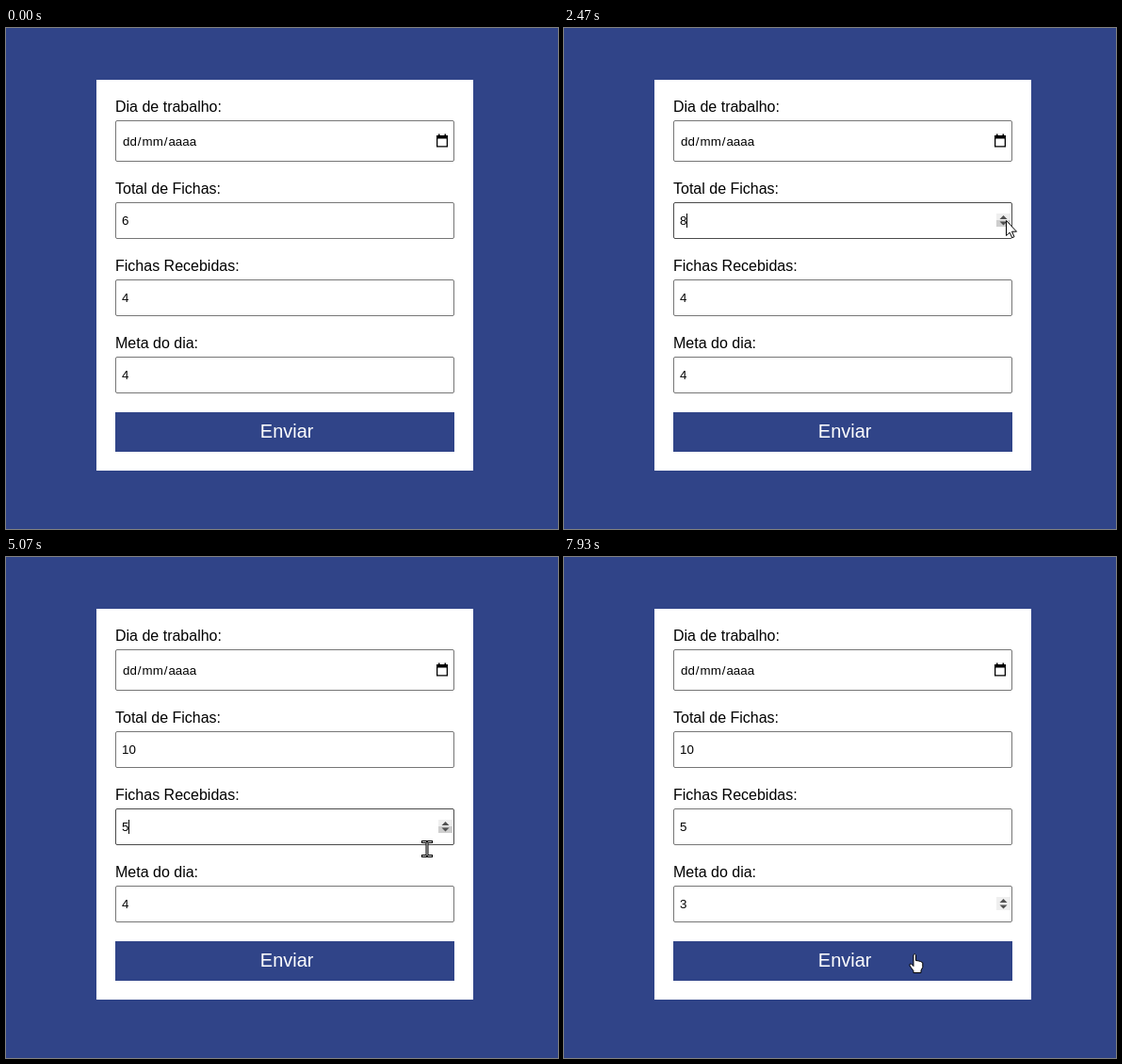
Animation, 586 px wide and 532 px high, one loop 7.99 s. Source, as an HTML page:

```html
<!DOCTYPE html>
<html lang="pt">
<head>
<meta charset="utf-8">
<style>
  html, body { margin: 0; width: 100%; height: 100%; overflow: hidden; background: #304488; }
  svg { display: block; width: 100vw; height: 100vh; font-family: Arial, "Liberation Sans", sans-serif; }
  .label { font-size: 16px; }
  .value { font-size: 13.333px; }
  .box { fill: #fff; stroke: #767676; }
</style>
</head>
<body>
<svg viewBox="0 0 586 532">
  <rect width="586" height="532" fill="#304488"/>
  <rect x="96" y="55" width="400" height="415" fill="#fff"/>

  <text class="label" x="116" y="89">Dia de trabalho:</text>
  <rect class="box" x="116.5" y="98.5" width="359" height="43" rx="1.5"/>
  <text class="value" y="125"><tspan x="124">dd</tspan><tspan dx="1">/</tspan><tspan dx="1">mm</tspan><tspan dx="1">/</tspan><tspan dx="1">aaaa</tspan></text>
  <path d="M457 114H459V112.5H460.5V114H465.500V112.5H467V114H469V126.500H457ZM458.300 117.500V125.200H467.700V117.500Z" fill-rule="evenodd"/>

  <g id="fields"></g>

  <rect x="116" y="408" width="360" height="42" fill="#304488"/>
  <text x="298.200" y="435" font-size="20" text-anchor="middle" fill="#fff">Enviar</text>

  <g id="cursor">
    <path id="arrow" d="M.5 .5V16.500L4.200 13.200L6.700 18.700L9 17.700L6.500 12.200H11.500Z" fill="#fff" stroke="#000"/>
    <g id="ibeam" fill="none">
      <path d="M-6 -7.500H6M-6 7.500H6M0 -8V8" stroke="#000" stroke-width="3"/>
      <path d="M-5 -7.500H-1M1 -7.500H5M-5 7.500H-1M1 7.500H5M0 -7V7" stroke="#ddd"/>
    </g>
    <path id="hand" d="M-1 1.500Q0 -.5 1.500 1.500V7.500L4 7.800L6.500 8.500L8.800 9.800V14.500L7 18V20.500H-1V18.500L-5 13Q-5.500 10.500 -3.500 11L-1 13.500Z" fill="#fff" stroke="#000" stroke-linejoin="round"/>
  </g>
</svg>
<script>
const LOOP = 7990, STEP = 68, BLINK = 500;
const SPIN_X = 459, SPIN_W = 15, SPIN_H = 14;

const fields = [
  { label: 'Total de Fichas:', top: 185, focus: [1550, 3860],
    values: [[0, 6], [2210, 7], [2470, 8], [2660, 9], [2930, 10]] },
  { label: 'Fichas Recebidas:', top: 267, focus: [3860, 5620], values: [[0, 4], [4680, 5]] },
  { label: 'Meta do dia:', top: 349, focus: [5620, LOOP], values: [[0, 4], [7050, 3]] },
];

// Pointer path: time, x, y
const path = [
  [510, 508, 500], [800, 425, 248], [1130, 425, 248], [1390, 398, 201],
  [1550, 398, 201], [1860, 469, 209], [2070, 469, 209], [2071, 469, 204],
  [3110, 469, 204], [3600, 365, 289], [3950, 365, 289], [4150, 511, 322],
  [4350, 465, 283], [5069, 465, 283], [5070, 447, 310], [5140, 447, 310],
  [5410, 405, 366], [5620, 405, 366], [6000, 478, 375], [6260, 468, 377],
  [6520, 468, 377], [6650, 468, 367], [7050, 468, 367], [7051, 468, 370],
  [7380, 468, 370], [7860, 372, 421], [LOOP, 372, 421],
];

const $ = id => document.getElementById(id);
const show = (el, on) => el.setAttribute('visibility', on ? 'visible' : 'hidden');

function add(parent, tag, attrs, text = '') {
  const el = document.createElementNS('http://www.w3.org/2000/svg', tag);
  for (const name in attrs) el.setAttribute(name, attrs[name]);
  el.textContent = text;
  return parent.appendChild(el);
}

for (const f of fields) {
  const g = $('fields'), y = f.spinTop = f.top + 12;
  add(g, 'text', { class: 'label', x: 116, y: f.top - 9 }, f.label);
  f.box = add(g, 'rect', { class: 'box', x: 116.5, y: f.top + .5, width: 359, height: 38, rx: 1.5 });
  f.text = add(g, 'text', { class: 'value', x: 123, y: f.top + 24 });
  f.caret = add(g, 'rect', { y: y, width: 1, height: 15 });
  f.spinner = add(g, 'g', {});
  add(f.spinner, 'rect', { x: SPIN_X, y, width: SPIN_W, height: SPIN_H, fill: '#efefef' });
  f.halves = [0, 7].map(dy =>
    add(f.spinner, 'rect', { x: SPIN_X, y: y + dy, width: SPIN_W, height: 7, fill: '#cecece' }));
  add(f.spinner, 'path', { d: `M462.5 ${y + 6}h8l-4-4zM462.5 ${y + 8.500}h8l-4 4z`, fill: '#505050' });
}

function pointerAt(t) {
  const i = path.findIndex(key => key[0] > t);
  if (i < 1) return null;
  const [a, x0, y0] = path[i - 1], [b, x1, y1] = path[i];
  const k = Math.min(1, (Math.floor((t - a) / STEP) + 1) * STEP / (b - a));
  const e = k * k * (3 - 2 * k);
  return { x: Math.round(x0 + (x1 - x0) * e), y: Math.round(y0 + (y1 - y0) * e) };
}

function draw(t) {
  const p = pointerAt(t), { x, y } = p || { x: -99, y: -99 };
  let shape = x > 116 && x < 476 && y > 408 && y < 450 ? 'hand' : 'arrow';

  for (const f of fields) {
    const [changed, value] = f.values.filter(v => v[0] <= t).pop();
    const focused = t >= f.focus[0] && t < f.focus[1];
    const hovered = x >= 116 && x < 476 && y >= f.top && y < f.top + 44;
    const onSpinner = hovered && x >= SPIN_X && x < SPIN_X + SPIN_W &&
      y >= f.spinTop && y < f.spinTop + SPIN_H;
    const leaving = hovered && t >= 5070 && t < 5140;
    const lower = leaving || y >= f.spinTop + 7;
    if (hovered && !onSpinner) shape = 'ibeam';

    f.text.textContent = value;
    f.box.style.stroke = hovered ? '#4a4a4a' : '#767676';
    const blinkOn = (t - Math.max(changed, f.focus[0])) % (2 * BLINK) < BLINK;
    f.caret.setAttribute('x', value > 9 ? 138 : 130);
    show(f.caret, focused && blinkOn);
    f.spinner.style.display = focused || hovered ? '' : 'none';
    f.halves.forEach((half, i) => show(half, (onSpinner || leaving) && lower === (i === 1)));
  }

  $('cursor').style.display = p ? '' : 'none';
  $('cursor').setAttribute('transform', `translate(${x} ${y})`);
  for (const id of ['arrow', 'ibeam', 'hand']) show($(id), id === shape);
}

const start = performance.now();
function frame() {
  draw((performance.now() - start) % LOOP);
  requestAnimationFrame(frame);
}
frame();
</script>
</body>
</html>
```
